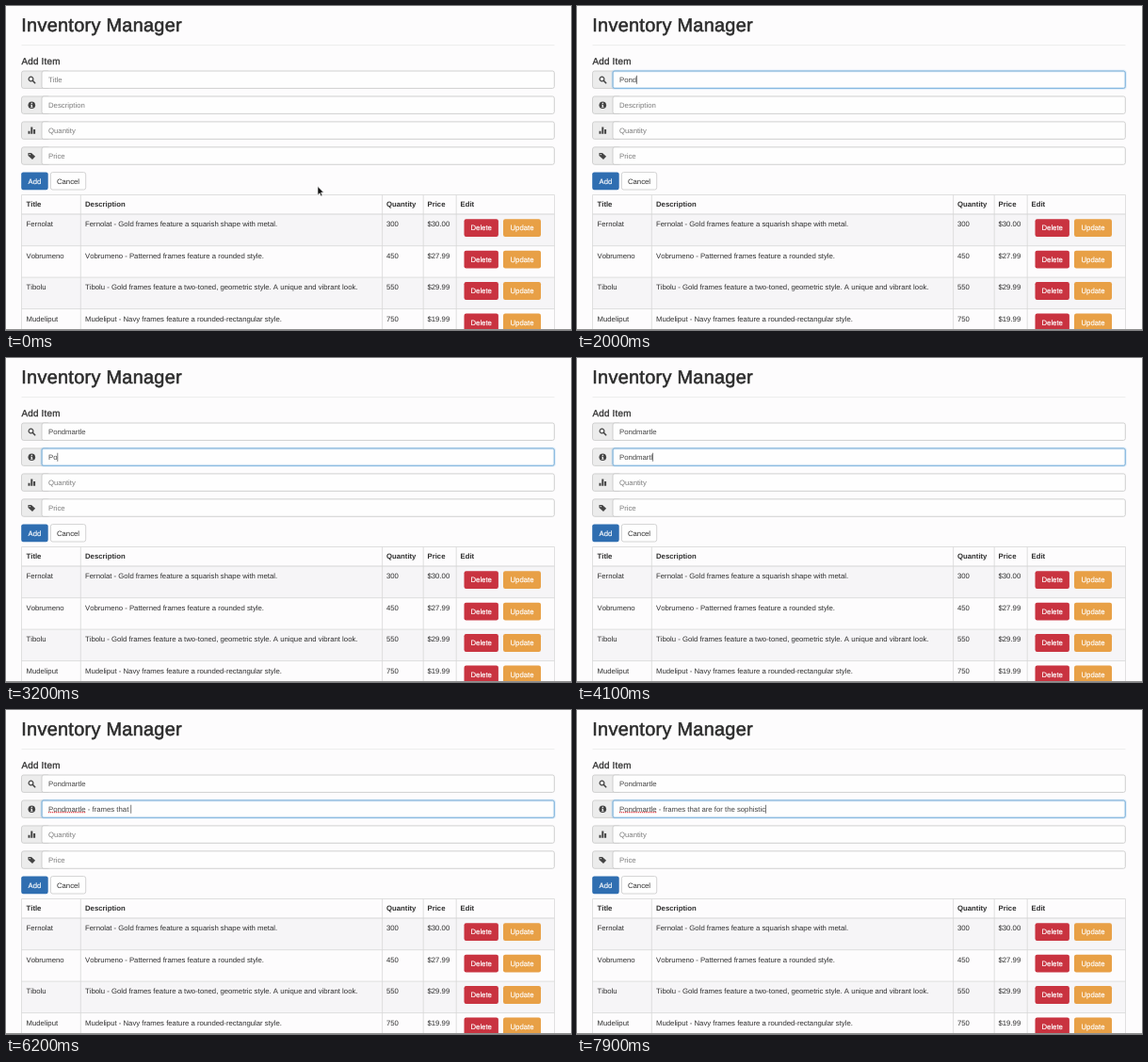
Write an HTML page that moves like this. It is 600x344 px and loops after 8 s.

```html
<!DOCTYPE html>
<html lang="en">
<head>
<meta charset="utf-8">
<title>Inventory Manager</title>
<style>
  html, body { margin: 0; width: 100%; height: 100%; overflow: hidden; background: #fdfcfd; }
  svg { display: block; width: 600px; height: 344px; }
  text {
    font: 7.75px "Liberation Sans", Arial, sans-serif; font-kerning: none;
    fill: #2e2e2e; white-space: pre; text-rendering: geometricPrecision;
  }
  .h1 { font-size: 19.9px; letter-spacing: .28px; stroke: #2b2b2b; stroke-width: .55px; fill: #2b2b2b; }
  .h4 { font-size: 9.9px; letter-spacing: .2px; stroke: #333; stroke-width: .3px; }
  .b { font-weight: bold; }
  .w { fill: #fff; stroke: #fff; stroke-width: .15px; text-anchor: middle; }
  .mid { text-anchor: middle; }
  .typed { fill: #444; }
  .hint { fill: #7c7c7c; }
  .menu { font-size: 7.6px; font-weight: bold; fill: #222; }
</style>
</head>
<body>
<svg id="stage" viewBox="0 0 600 344"></svg>
<script>
const LOOP = 8000;
const NAME = "Pondmartle";
const DETAIL = NAME + " - frames that are for the sophistic";
const HINTS = ["Title", "Description", "Quantity", "Price"];
const ITEMS = [
  ["Fernolat", "Gold frames feature a squarish shape with metal.", 300, "$30.00"],
  ["Vobrumeno", "Patterned frames feature a rounded style.", 450, "$27.99"],
  ["Tibolu", "Gold frames feature a two-toned, geometric style. A unique and vibrant look.", 550, "$29.99"],
  ["Mudeliput", "Navy frames feature a rounded-rectangular style.", 750, "$19.99"]
];
const COLS = [21.5, 84, 404, 447.5, 482.5];

// [time, letters typed]
const TITLE_KEYS = [[900, 0], [1000, 1], [1200, 1], [1300, 2], [1500, 2], [1600, 3], [1700, 3],
  [1800, 4], [2000, 4], [2100, 6], [2200, 7], [2300, 7], [2400, 9], [2500, 10]];
const DETAIL_KEYS = [[2900, 0], [3500, 4], [4100, 9], [4400, 11], [6200, 25], [7900, 46]];

const rowY = i => 69 + 26.95 * i;
const clamp = v => Math.max(0, Math.min(1, v));
const ramp = (t, a, b) => clamp((t - a) / (b - a));

const text = (x, y, s, cls = "", extra = "") =>
  `<text x="${x}" y="${y}" class="${cls}" ${extra}>${s}</text>`;
const rect = (x, y, w, h, fill, stroke = "none", r = 0, extra = "") =>
  `<rect x="${x}" y="${y}" width="${w}" height="${h}" rx="${r}" fill="${fill}" stroke="${stroke}" ${extra}/>`;
const path = (d, extra) => `<path d="${d}" ${extra}/>`;
const button = (x, y, w, label, fill) =>
  rect(x, y, w, 18.8, fill, "none", 2.2) + text(x + w / 2, y + 12.1, label, "w");

// Icons are drawn around the origin
const ICONS = [
  '<circle cx="-.8" cy="-.8" r="2.4" fill="none" stroke="#444" stroke-width="1.2"/>' +
    path("M1 1L3.4 3.4", 'stroke="#444" stroke-width="1.6" stroke-linecap="round"'),
  '<circle r="3.8" fill="#444"/>' +
    path("M-.6 -2.5H.7V-1.3H-.6ZM-1.1 -.6H.7V1.7H1.2V2.5H-1.2V1.7H-.6V.2H-1.1Z", 'fill="#eee"'),
  path("M-3.8 3.6V.6H-1.8V3.6ZM-1 3.6V-3.8H1V3.6ZM1.8 3.6V-1.2H3.8V3.6Z", 'fill="#444"'),
  path("M-3.8 -3.2H-.4L3.8 .6L.7 3.8L-3.8 -.2ZM-2.6 -2.1V-1H-1.5V-2.1Z",
    'fill="#444" fill-rule="evenodd"')
];

function field(hint, i) {
  const y = rowY(i);
  return rect(16.5, y, 30, 18.4, "#ececec", "#c8c8c8", 2.2, 'stroke-width=".8"') +
    rect(38, y, 544.3, 18.4, "#fefefe", "#c4c4c4", 2, 'stroke-width=".8"') +
    `<g transform="translate(27.3 ${y + 9.3})">${ICONS[i]}</g>` +
    `<g id="halo${i}">` +
    rect(38, y, 544.3, 18.4, "none", "#66afe9", 2, 'stroke-width="3" opacity=".16"') +
    rect(38, y, 544.3, 18.4, "none", "#7ab6e4", 2, 'stroke-width=".9"') + "</g>" +
    text(45, y + 11.9, hint, "hint", `id="field${i}"`);
}

function item([name, about, count, price], i) {
  const y = 221.2 + 33.45 * i;
  const cells = [name, `${name} - ${about}`, count, price];
  return rect(16.5, y, 566, 33.45, i % 2 ? "#fdfcfd" : "#f6f5f7") +
    cells.map((s, c) => text(COLS[c], y + 13, s)).join("") +
    button(486.5, y + 5, 36.4, "Delete", "#c93340") +
    button(528, y + 5, 40, "Update", "#e8a046");
}

function table() {
  const lines = "M16.5 200.5H582.5" + [16.5, 79.3, 399.6, 443.2, 478.2, 582.5]
    .map(x => `M${x} 200.5V344`).join("") +
    [1, 2, 3].map(i => `M16.5 ${221.2 + 33.45 * i}H582.5`).join("");
  return ITEMS.map(item).join("") +
    ["Title", "Description", "Quantity", "Price", "Edit"]
      .map((s, c) => text(COLS[c], 213.4, s, "b")).join("") +
    path(lines, 'stroke="#d9d9d9" stroke-width=".8" fill="none"') +
    path("M16.5 221H582.5", 'stroke="#d6d6d6" stroke-width="1.1"');
}

const stage = document.getElementById("stage");
stage.innerHTML =
  rect(0, 0, 600, 344, "#fdfcfd") +
  text(16.3, 27.2, "Inventory Manager", "h1") +
  path("M16.5 41.6H582.5", 'stroke="#e9e9e9" stroke-width=".8"') +
  text(16.5, 62, "Add Item", "h4") +
  HINTS.map(field).join("") +
  button(16.2, 176.4, 28.5, "Add", "#2f6eb1") +
  rect(47.4, 176.6, 37.3, 18.4, "#fefefe", "#c8c8c8", 2.2, 'stroke-width=".8"') +
  text(66, 188.5, "Cancel", "mid") +
  table() +
  path("M0 343.5H600", 'stroke="#8f8f8f"') +
  path("M45 108.7H84.4", 'id="wavy" stroke="#e0424a" stroke-width="1.2" stroke-dasharray="1.2 .8"') +
  rect(0, 0, .7, 9, "#444", "none", 0, 'id="caret"') +
  '<g id="menu">' +
    rect(37.5, 89.5, 80, 49, "#000", "none", 1, 'opacity=".08"') +
    rect(38, 88.3, 78.8, 48.2, "#fff", "#cfcfcf", 1, 'stroke-width=".7"') +
    text(44.3, 105.2, "xhghg", "menu") + text(44.3, 125, "this is the title", "menu") +
  "</g>" +
  path("M0 0V9.2L2.1 7.2L3.5 10.4L5 9.7L3.6 6.6H6.4Z",
    'id="arrow" fill="#111" stroke="#fff" stroke-width=".6"') +
  path("M-2 -4.2Q0 -4.2 0 -3Q0 -4.2 2 -4.2M0 -3.2V3.2M-2 4.2Q0 4.2 0 3Q0 4.2 2 4.2M-1 1H1",
    'id="beam" fill="none" stroke="#222" stroke-width="1"');

const el = id => document.getElementById(id);
const show = (id, on) => el(id).setAttribute("visibility", on ? "visible" : "hidden");

function typed(keys, t) {
  let n = 0;
  keys.forEach(([at, count], i) => {
    if (t < at) return;
    const [end, next] = keys[i + 1] || [at + 1, count];
    n = count + (next - count) * ramp(t, at, end);
  });
  return Math.floor(n + 1e-6);
}

function fill(i, s) {
  const node = el("field" + i);
  node.textContent = s || HINTS[i];
  node.setAttribute("class", s ? "typed" : "hint");
  return s ? node.getComputedTextLength() : 0;
}

function draw(time) {
  const t = Math.floor(time / 100) * 100;
  const title = NAME.slice(0, typed(TITLE_KEYS, t));
  const detail = DETAIL.slice(0, typed(DETAIL_KEYS, t));
  const widths = [fill(0, title), fill(1, detail)];

  const swap = ramp(t, 2640, 2800);
  const glow = [ramp(t, 450, 600) * (1 - swap), swap, 0, 0];
  glow.forEach((v, i) => el("halo" + i).setAttribute("opacity", v));

  const active = t >= 2700 ? 1 : 0;
  show("caret", t >= 500);
  el("caret").setAttribute("x", 45 + widths[active]);
  el("caret").setAttribute("y", rowY(active) + 4.8);
  show("wavy", detail.length > NAME.length);
  show("menu", t >= 600 && t < 1000);

  const p = ramp(t, 0, 300), e = p * p * (3 - 2 * p);
  const x = 331 - 130 * e, y = 191.5 - 111.5 * e;
  const over = HINTS.some((_, i) => y >= rowY(i) && y <= rowY(i) + 18.4);
  const pointer = t < 1000;
  show("arrow", pointer && !over);
  show("beam", pointer && over);
  for (const id of ["arrow", "beam"]) el(id).setAttribute("transform", `translate(${x} ${y})`);
}

let start;
function tick(now) {
  start ??= now;
  draw((now - start) % LOOP);
  requestAnimationFrame(tick);
}
draw(0);
requestAnimationFrame(tick);
</script>
</body>
</html>
```
